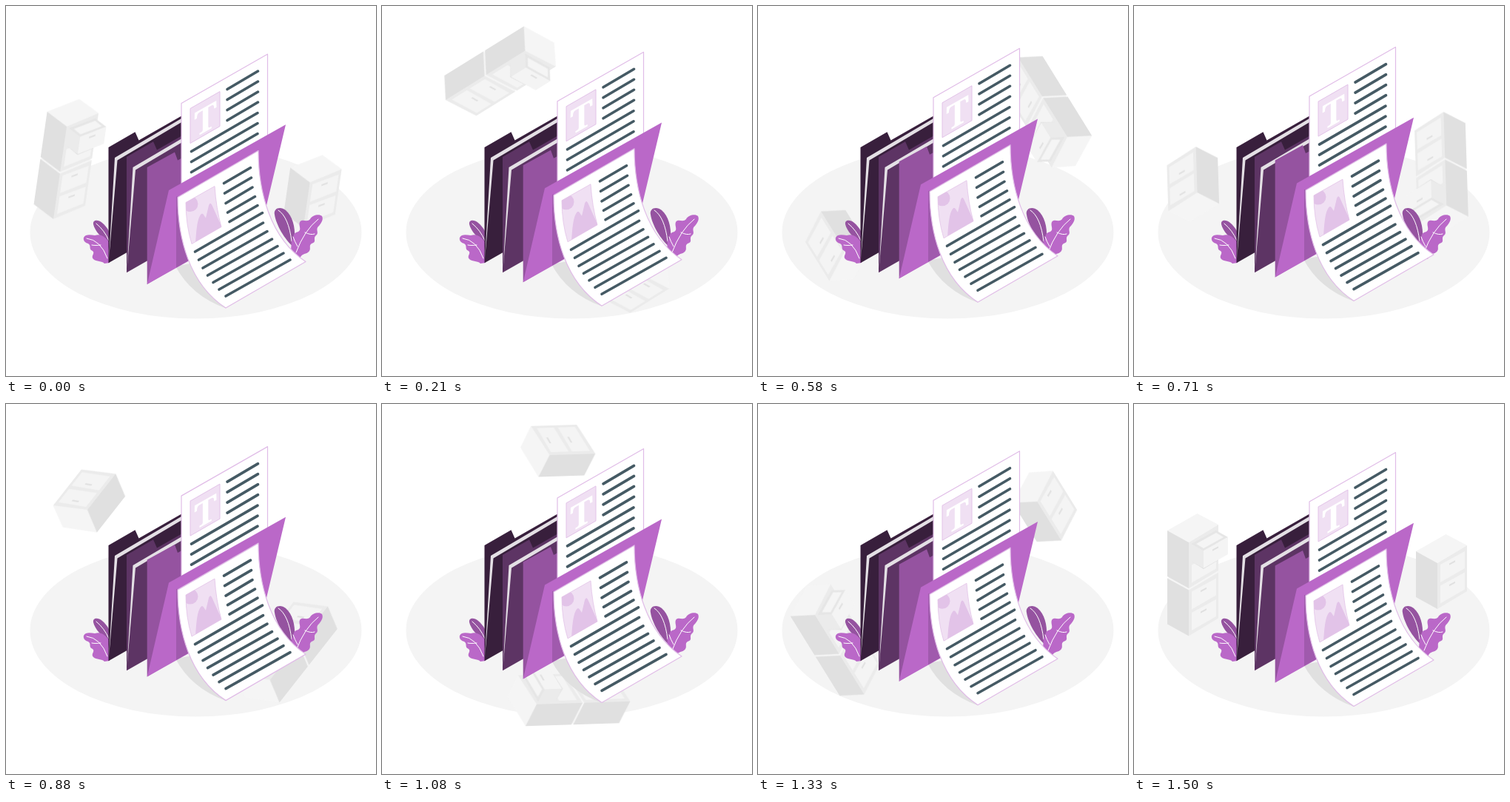
Recreate the animation shown at these times as an HTML page without scripts. Size 500 by 500 pixels, loop 1.54 s.

```html
<!DOCTYPE html>
<html lang="en">
<head>
<meta charset="utf-8">
<title>Folders and documents</title>
<style>
  html, body { margin: 0; height: 100%; overflow: hidden; background: #fff; }
  svg { display: block; width: 100vw; height: 100vh; }

  /* 37 ticks per loop; the last one is the rest pose */
  .orbit { transform-origin: 247.5px 231px; animation: orbit 1540ms -5ms infinite; }
  .float { animation: float 1540ms -5ms infinite; }
  @keyframes orbit {
    0% { transform: rotate(8.2deg); animation-timing-function: steps(36); }
    97.297% { transform: rotate(368.2deg); animation-timing-function: step-end; }
    97.298%, 100% { transform: rotate(360deg); }
  }
  @keyframes float {
    0% { transform: translateY(-.456px); animation-timing-function: steps(18); }
    48.648% { transform: translateY(-10.456px); animation-timing-function: step-end; }
    48.649% { transform: translateY(-9.544px); animation-timing-function: steps(18); }
    97.297% { transform: translateY(.456px); animation-timing-function: step-end; }
    97.298%, 100% { transform: translateY(0); }
  }

  .top { fill: #f5f5f5; }
  .side { fill: #e0e0e0; }
  .front { fill: #ebebeb; }
  .panel { fill: #f4f4f4; }
  .dark { fill: #9553a0; }
  .main { fill: #ba68c8; }
  .sheet { fill: #fff; stroke: #e0bce7; stroke-width: 1.2; stroke-linejoin: round; }
  .tint { fill: #f0e0f3; }
  .tint2 { fill: #e2c3e8; }
  .lines { fill: none; stroke: #455a64; stroke-width: 3.6; stroke-linecap: round; }
  .vein { fill: none; stroke: #fff; stroke-width: 1; stroke-linecap: round; }
  .letter { font: bold 47px "Noto Serif", serif; fill: #fff; text-anchor: middle; }
</style>
</head>
<body>
<svg viewBox="0 0 500 500">
  <defs>
    <g id="drawer">
      <path class="panel" d="M33 18L66 0V23L33 42Z"/>
      <path class="side" d="M45 16.5L53 12.3V14.5L45 18.7Z"/>
    </g>
    <g id="shell">
      <path class="top" d="M0 0L40.5-23L69-8L29 16Z"/>
      <path class="side" d="M0 0L29 16V78L0 62Z"/>
      <path class="front" d="M29 16L69-8V54L29 78Z"/>
      <use href="#drawer" y="28.5"/>
    </g>
    <g id="cabinet">
      <use href="#shell"/>
      <use href="#drawer"/>
    </g>
    <g id="folder">
      <path d="M138.500 191L174.500 170.300L179.500 181.500L260 135.500V278L138.500 347.300Z"/>
      <path fill="#e4e0e5" d="M260 138.500L147 205L139 342L150.500 208.500L260 143.500Z"/>
    </g>
    <clipPath id="frame"><path id="picture" d="M243 266L282 244Q284 274 291 299L251 322Q243 296 243 266Z"/></clipPath>
  </defs>

  <ellipse cx="256.500" cy="306" rx="224" ry="116.500" fill="#f4f4f4"/>

  <g class="orbit">
    <use href="#cabinet" x="45" y="235.500"/>
    <g transform="translate(45 171)">
      <use href="#shell"/>
      <path class="side" d="M33 18L66 0V23L69 28V40L49 52L33 42Z"/>
      <path class="front" d="M33 18L49 27V51L33 42Z"/>
      <path fill="#e6e6e6" d="M33 18L66 0L82 9L49 27Z"/>
      <path class="top" d="M39 18L66 3L76 9L49 24Z"/>
      <use href="#drawer" x="16" y="9"/>
    </g>
    <use href="#cabinet" x="381" y="199"/>
  </g>

  <g>
    <path class="dark" d="M141 322C130 315 120 304 118 295C117 289 124 288 130 293C137 299 141 306 142 314Z"/>
    <path class="vein" d="M122 294Q133 303 139 317"/>
    <path class="main" d="M105 313C107 308 114 309 120 310C130 307 135 314 140 320V347L133 348C130 344 122 346 118 342C114 338 121 334 117 331C111 329 116 324 111 321C107 320 104 317 105 313Z"/>
    <path class="vein" d="M109 314Q128 316 137 341M128 323Q120 324 116 323"/>
    <path class="dark" d="M388 325C377 316 365 296 363 282C361 273 371 270 378 276C387 284 391 298 390 314Z"/>
    <path class="vein" d="M368 276Q382 285 386 318"/>
    <path class="main" d="M427 284C424 281 414 282 411 288C407 293 400 287 397 292C395 297 400 302 395 305C386 307 390 313 386 317L385 330L397 342C399 334 404 336 408 333C414 329 408 324 413 321C421 319 414 314 419 310C424 306 417 302 423 297C427 292 429 288 427 284Z"/>
    <path class="vein" d="M422 288Q403 303 392 333M404 306Q412 310 417 308M394 325Q390 318 388 312"/>
  </g>

  <use href="#folder" fill="#381f3c"/>
  <use href="#folder" x="24.500" y="13" fill="#5d3464"/>

  <g class="float">
    <path class="side" d="M229 352Q250 392 297 409L300 340Z"/>
    <path class="dark" d="M190.700 218.500L228 198L232 209L260 194V336L190.700 376.500Z"/>

    <path class="sheet" d="M237 132L353.500 65.500V230L237 290Z"/>
    <path class="tint" stroke="#e2c3e8" d="M249 139L289 116V163L249 186Z"/>
    <text class="letter" transform="matrix(1 -.57 0 1 249 139)" x="20.500" y="43">T</text>
    <path class="lines" d="M299 113l41.500-24.500m-41.500 38.500l41.500-24.500m-41.500 38.500l41.500-24.500m-41.500 38.500l41.500-24.500M250.500 197l89.500-52m-89.500 66l89.500-52m-89.500 66l89.500-52"/>

    <path class="main" d="M190.700 376.500L220 249.500L378 160.700L352 270V286Z"/>
    <path fill="#a05aad" d="M230 258H260V337L230 354Z"/>

    <path class="sheet" d="M232 259L341 196C341 250 356 313 405 346L297 408.500C247 376 232 313 232 259Z"/>
    <g clip-path="url(#frame)">
      <path class="tint" d="M240 240h55v85h-55z"/>
      <circle class="tint2" cx="249" cy="268" r="10.500"/>
      <path class="tint2" d="M256 322C257 306 258 291 262 284Q265 278 268 284L270 287L274 270Q276 264 279 271L292 300Z"/>
    </g>
    <use href="#picture" fill="none" stroke="#e2c3e8" stroke-width=".8"/>
    <path class="lines" d="M294.500 240l36-21M295.500 253.500l36-21M297 267l36-21.500M299.500 279.500l37-21.500M302 292l38-22M255.500 332.500l91-52.500M260.500 343.500l87-50M266 354.500l87-49.500M272.500 364.500l87-49M280 374l87-49M288 383.500l87-49M297 392.500l87-49"/>
  </g>
</svg>
</body>
</html>
```
